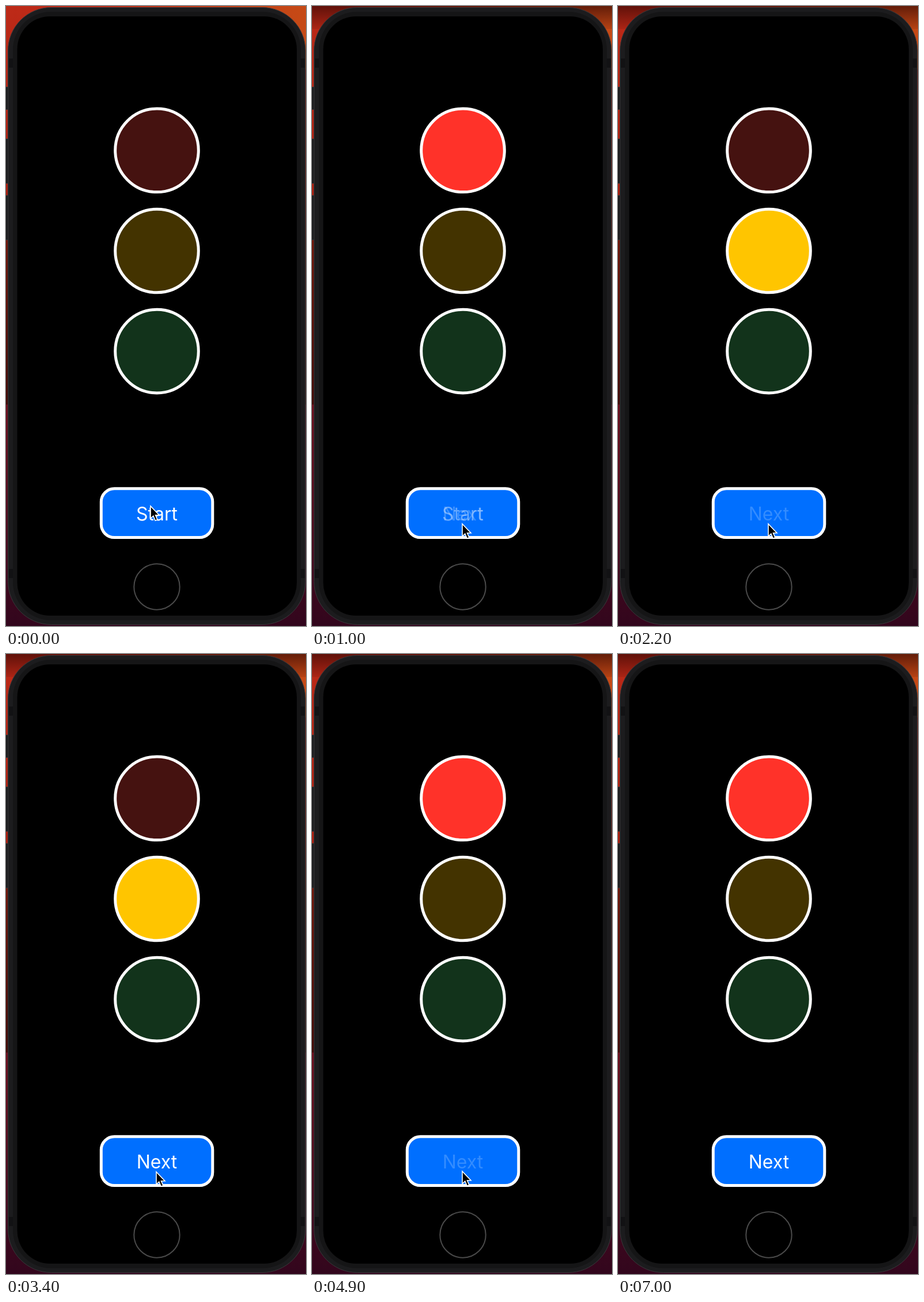
Recreate the animation shown at these times as an HTML page. Size 521 px wide and 1075 px high, loop 7100 ms.

```html
<!DOCTYPE html>
<html lang="en">
<head>
<meta charset="utf-8">
<title>Traffic light</title>
<style>
  html, body { margin: 0; width: 100%; height: 100%; overflow: hidden; background: #000; }
  svg { display: block; width: 521px; height: 1075px; }
  text { font: 400 32px Inter, "Liberation Sans", sans-serif; fill: #fff; text-anchor: middle; }
</style>
</head>
<body>
<svg viewBox="0 0 521 1075">
  <defs>
    <linearGradient id="wall" x2="0" y2="1">
      <stop offset="0" stop-color="#bd2a18"/>
      <stop offset=".3" stop-color="#a81d0e"/>
      <stop offset=".38" stop-color="#6e1408"/>
      <stop offset=".643" stop-color="#400805"/>
      <stop offset=".643" stop-color="#6c0d1c"/>
      <stop offset="1" stop-color="#32061d"/>
    </linearGradient>
    <linearGradient id="glow">
      <stop offset=".3" stop-color="#c64a16" stop-opacity="0"/>
      <stop offset="1" stop-color="#c64a16"/>
    </linearGradient>
    <linearGradient id="shade" x2="0" y2="1">
      <stop offset="0" stop-color="#200" stop-opacity=".6"/>
      <stop offset="1" stop-color="#200" stop-opacity=".1"/>
    </linearGradient>
  </defs>

  <rect width="521" height="1075" fill="url(#wall)"/>
  <rect width="521" height="110" fill="url(#glow)"/>
  <rect id="topShade" width="521" height="40" fill="url(#shade)"/>

  <g fill="#1a1a1c" stroke="#303033">
    <rect x="-4" y="140.5" width="12" height="39"/>
    <rect x="-4" y="230.5" width="12" height="77"/>
    <rect x="-4" y="328.5" width="12" height="77"/>
  </g>
  <rect x="3.5" y="2.5" width="516.5" height="1070" rx="75" fill="#1c1c1e" stroke="#38383a"/>
  <g fill="#121214">
    <rect x="5" y="91" width="8" height="16"/>
    <rect x="512" y="91" width="7" height="16"/>
    <rect x="5" y="976" width="8" height="16"/>
    <rect x="512" y="976" width="7" height="16"/>
  </g>
  <rect x="12" y="10" width="500" height="1055" rx="66" fill="#151516"/>
  <rect x="19.5" y="18" width="485.5" height="1039" rx="57"/>
  <circle cx="262" cy="1007" r="39.7" stroke="#4a4a4a" stroke-width="2"/>

  <g id="lights" stroke="#fff" stroke-width="5">
    <circle cx="262" cy="250.3" r="72.3"/>
    <circle cx="262" cy="424.5" r="72.3"/>
    <circle cx="262" cy="598.6" r="72.3"/>
  </g>

  <rect x="165.3" y="836.8" width="193.5" height="84.8" rx="23" fill="#006fff" stroke="#fff" stroke-width="5"/>
  <text id="start" x="262" y="891.5">Start</text>
  <text id="next" x="262" y="891.5">Next</text>
  <path id="cursor" d="M0 0V21.5L4.8 17.2L8.2 25.3L12 23.7L8.6 15.8H15Z" stroke="#fff" stroke-width="1.6"/>
</svg>
<script>
const LOOP = 7100, STEP = 100;
const byId = id => document.getElementById(id);
const lights = [...byId("lights").children];
const ON = ["#ff3229", "#ffc500", "#30be50"];
const OFF = ["#451210", "#433300", "#12331b"];
const RELEASES = [900, 2200, 3600, 4900];
const DIM = 0.2;

// Cursor keys: time, x, y of the tip.
const PATH = [[200, 251, 867], [800, 261, 898], [4700, 261, 898], [4800, 261, 897],
              [5900, 261, 897], [6500, 300, 1090]];

const clamp = v => Math.min(1, Math.max(0, v));
const ramp = (t, from, to) => clamp((t - from) / (to - from));

function cursorAt(t) {
  let [, x, y] = PATH[0];
  for (let i = 1; i < PATH.length; i++) {
    const [from, x0, y0] = PATH[i - 1], [to, x1, y1] = PATH[i];
    if (t < from) break;
    const p = ramp(t, from, to), eased = p * p * (3 - 2 * p);
    x = x0 + (x1 - x0) * eased;
    y = y0 + (y1 - y0) * eased;
  }
  return [x, y];
}

// The label dims while pressed and brightens again after release.
function nextOpacity(t) {
  if (t < 2000) return ramp(t, 900, 1350);
  for (const release of RELEASES.slice(1)) {
    if (t >= release - STEP && t < release + 300) {
      return DIM + (1 - DIM) * ramp(t, release, release + 300);
    }
  }
  return 1;
}

function draw(t) {
  const clicks = RELEASES.filter(release => t >= release).length;
  const active = clicks ? (clicks - 1) % 3 : -1;
  lights.forEach((light, i) => light.setAttribute("fill", i === active ? ON[i] : OFF[i]));
  byId("start").setAttribute("opacity", 1 - ramp(t, 800, 1130));
  byId("next").setAttribute("opacity", nextOpacity(t));
  byId("topShade").setAttribute("opacity", t < 200 ? 0 : 1);
  byId("cursor").setAttribute("transform", `translate(${cursorAt(t)})`);
}

const began = performance.now();
function frame() {
  const t = (performance.now() - began) % LOOP;
  draw(Math.floor(t / STEP) * STEP);
  requestAnimationFrame(frame);
}
frame();
</script>
</body>
</html>
```
